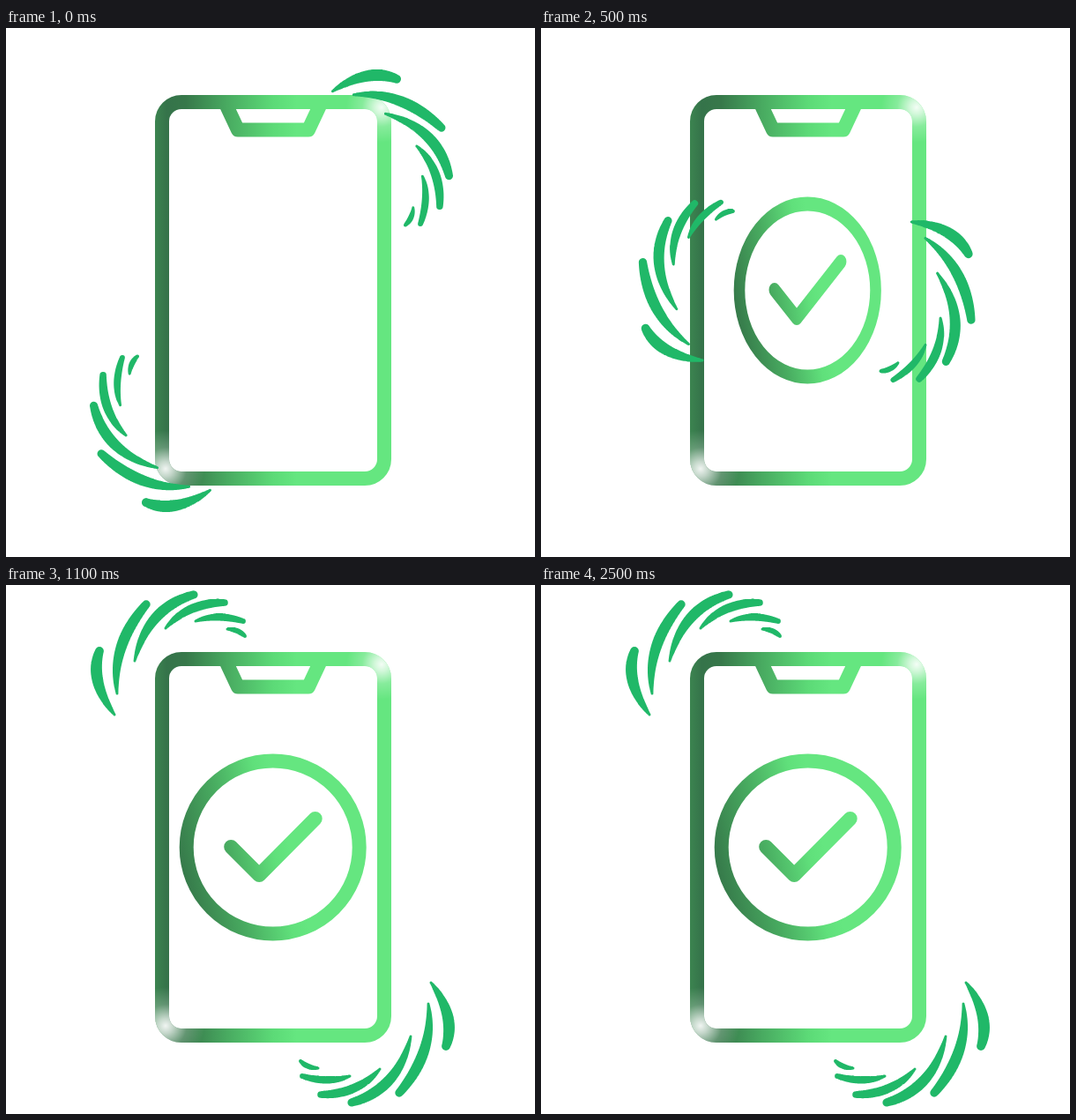
These frames come from a looping animation (600 px wide and 600 px high, 2600 ms). An HTML page with a canvas:

```html
<!DOCTYPE html>
<html lang="en">
<head>
<meta charset="utf-8">
<title>Phone check</title>
<style>
html, body { margin: 0; width: 100%; height: 100%; overflow: hidden; background: #fff; }
canvas { display: block; }
</style>
</head>
<body>
<canvas id="stage" width="600" height="600"></canvas>
<script>
const ctx = document.getElementById('stage').getContext('2d');
const LOOP = 2600, STEP = 100;
const TURN = 87.5 * Math.PI / 180;

function withStops(gradient, stops) {
  stops.forEach(([at, color]) => gradient.addColorStop(at, color));
  return gradient;
}

const phone = new Path2D();
phone.roundRect(177, 84, 252, 427, 22);
phone.moveTo(248.2, 84);
phone.lineTo(263, 115.5);
phone.lineTo(343, 115.5);
phone.lineTo(357.8, 84);

const badge = new Path2D();
badge.arc(2, 0, 98, 0, 7);
badge.moveTo(-45.5, -0.5);
badge.lineTo(-13.5, 31.5);
badge.lineTo(50, -32.5);

const phoneFill = withStops(ctx.createLinearGradient(169, 300, 437, 300), [
  [0, '#3c8450'], [0.05, '#35734a'], [0.13, '#37784a'], [0.3, '#48a960'],
  [0.5, '#5cda77'], [0.6, '#65e680'], [1, '#65e680']
]);
const badgeFill = withStops(ctx.createLinearGradient(-102, 24, 20, -4), [
  [0, '#36794a'], [0.45, '#48ab60'], [0.85, '#60e07b'], [1, '#65e680']
]);

function flare(x, y, r) {
  return withStops(ctx.createRadialGradient(x, y, 0, x, y, r), [
    [0, 'rgba(255,255,255,.93)'], [0.2, 'rgba(255,255,255,.7)'],
    [0.55, 'rgba(255,255,255,.22)'], [1, 'rgba(255,255,255,0)']
  ]);
}
const flares = [flare(181, 500, 44), flare(426, 90, 40)];

// Each blade: head, control point, tail, head radius.
const blades = [
  [106, 75, 94, 108, 123, 147, 4.9],
  [159, 22, 119, 68, 126, 123, 4.7],
  [213, 11, 160, 26, 146, 86, 4.6],
  [248, 20, 206, 20, 181, 49, 3.8],
  [269, 41, 239, 32, 215, 41, 2.9],
  [271, 58, 263, 50, 251, 50, 2]
];

const spray = new Path2D();
for (const [hx, hy, cx, cy, tx, ty, r] of blades) {
  for (let i = 0; i <= 120; i++) {
    const u = i / 120, v = 1 - u;
    const x = v * v * hx + 2 * u * v * cx + u * u * tx - 185.5;
    const y = v * v * hy + 2 * u * v * cy + u * u * ty - 77.5;
    const w = r * v * (1 + 2.5 * u) + 1.5 * u;
    spray.moveTo(x + w, y);
    spray.arc(x, y, w, 0, 7);
  }
}

const mix = (a, b, p) => a + (b - a) * p;

function drawSpray(from, to, angle, p) {
  ctx.save();
  ctx.translate(mix(from[0], to[0], p), mix(from[1], to[1], p));
  ctx.rotate(angle - (1 - p) * TURN);
  ctx.fill(spray);
  ctx.restore();
}

function draw(t) {
  ctx.clearRect(0, 0, 600, 600);
  ctx.lineWidth = 16;
  ctx.lineJoin = 'round';

  ctx.lineCap = 'butt';
  for (const style of [phoneFill, ...flares]) {
    ctx.strokeStyle = style;
    ctx.stroke(phone);
  }

  const q = Math.min(1, Math.max(0, (t - 24) / 1076));
  const width = 1 - (1 - q) ** 2.66;
  if (width > 0) {
    ctx.save();
    ctx.translate(300.7, 297.5);
    ctx.scale(width, 1);
    ctx.lineCap = 'round';
    ctx.strokeStyle = badgeFill;
    ctx.stroke(badge);
    ctx.restore();
  }

  const p = Math.min(1, t / 1090);
  ctx.fillStyle = '#20b868';
  drawSpray([164.8, 458.8], [185.5, 77.5], 0, p);
  drawSpray([437.2, 137.2], [419.5, 520.5], Math.PI, p);
}

let start;
function tick(now) {
  start ??= now;
  draw(Math.floor((now - start) % LOOP / STEP) * STEP);
  requestAnimationFrame(tick);
}
requestAnimationFrame(tick);
</script>
</body>
</html>
```
